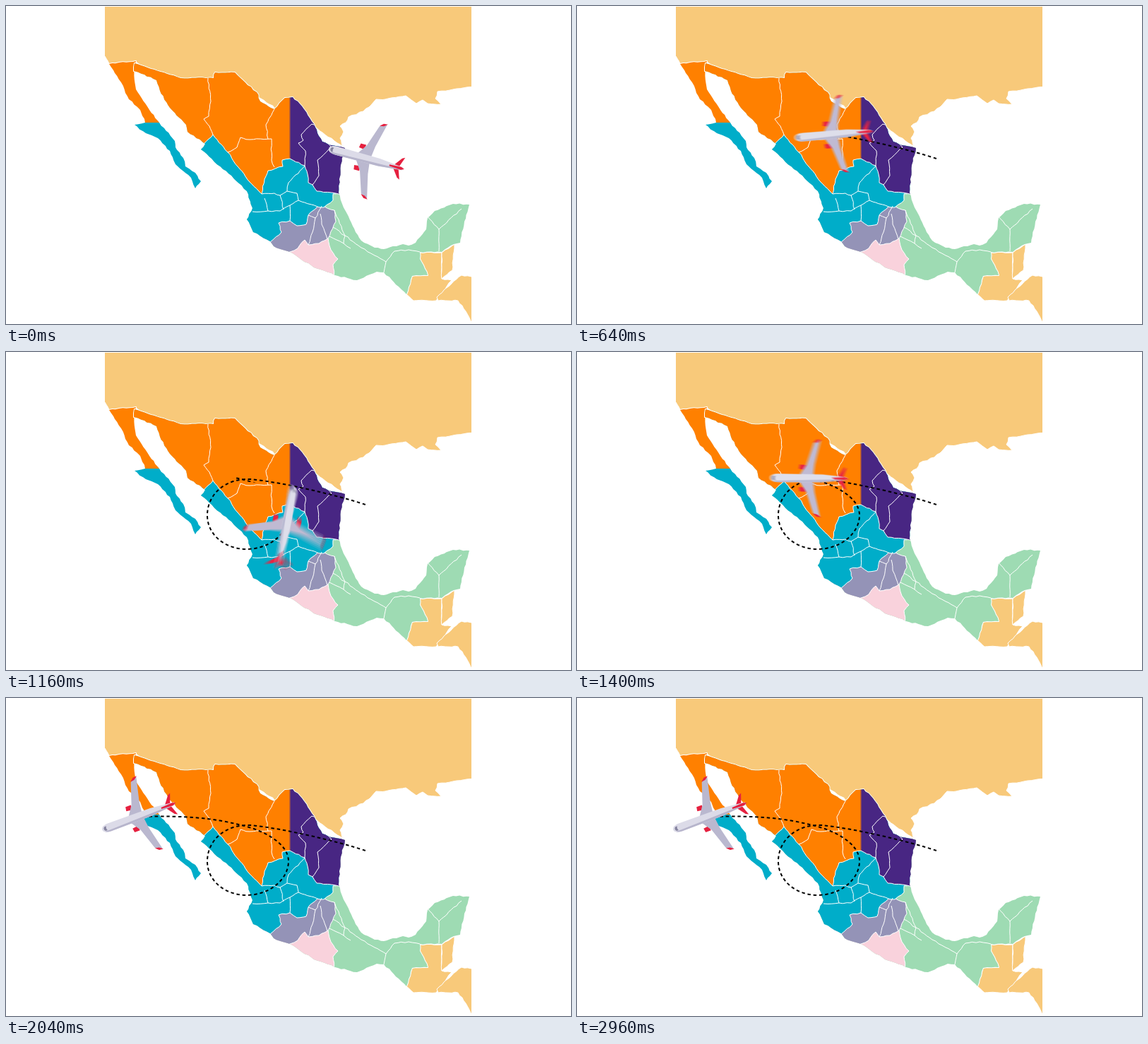
An HTML page with a canvas that plays this animation: 800x450 px, repeating every 3 s.

```html
<!DOCTYPE html>
<html lang="en">
<head>
<meta charset="utf-8">
<title>Flight over the map</title>
<style>
html, body { margin: 0; width: 100%; height: 100%; overflow: hidden; background: #fff; }
canvas { display: block; width: 800px; height: 450px; }
</style>
</head>
<body>
<canvas id="stage" width="800" height="450"></canvas>
<script>
const W = 800, H = 450, LOOP = 3000, FLIGHT = 2020, SHUTTER = 14, SAMPLES = 6;
const PEACH = '#f8c97a', ORANGE = '#ff8000', TEAL = '#00adc9', PURPLE = '#482683';
const LAVENDER = '#9493b7', PINK = '#f9d2dc', GREEN = '#9edbb3';
const RED = '#e5203f', WING = '#bab8cf', BODY = '#dcdbe8', SHADE = '#b7b5cc';

function layer() {
  const c = document.createElement('canvas');
  c.width = W;
  c.height = H;
  return c.getContext('2d');
}

const ctx = document.getElementById('stage').getContext('2d');
const trail = layer(), blur = layer(), scratch = layer();

let seed = 7;
function random() {
  seed = (seed * 16807) % 2147483647;
  return seed / 2147483647;
}

// joins a few key points with a slightly ragged line
function ragged(text, closed) {
  const pts = text.split(' ').map(s => s.split(',').map(Number));
  const path = new Path2D();
  path.moveTo(...pts[0]);
  const wobble = () => (random() - 0.5) * 1.6;
  for (let i = 1; i < pts.length + (closed ? 1 : 0); i++) {
    const [x0, y0] = pts[i - 1], [x1, y1] = pts[i % pts.length];
    const n = Math.max(1, Math.round(Math.hypot(x1 - x0, y1 - y0) / 5));
    for (let k = 1; k < n; k++) {
      path.lineTo(x0 + (x1 - x0) * k / n + wobble(), y0 + (y1 - y0) * k / n + wobble());
    }
    path.lineTo(x1, y1);
  }
  if (closed) path.closePath();
  return path;
}

// neighbouring lands; each runs on beneath the mainland or past the frame
const lands = [
  '130,-9 669,-9 669,113 638,117 611,121 608,131 616,139 597,138 590,133 581,138 566,127 537,132 524,132 514,143 506,149 485,157 481,165 473,170 478,178 473,187 477,199 420,160 390,150 330,112 250,108 200,91 184,79 146,82 140,71 130,60',
  '586,349 617,349 617,386 631,388 609,417 577,417 567,408 575,382 597,381 586,359',
  '617,349 635,337 632,374 617,386',
  '669,384 645,381 620,402 610,412 612,417 640,417 651,432 659,448 669,448'
];

const mainland = '182,81 247,102 294,102 296,94 324,94 342,112 355,122 360,135 380,146 395,130 406,129 422,146 436,167 441,180 448,192 460,197 480,201 474,225 471,264 476,280 495,320 503,332 522,342 535,344 562,337 570,339 580,335 595,316 597,300 607,290 633,280 656,281 649,305 643,335 634,337 617,348 586,348 586,358 597,381 575,382 567,408 535,377 525,376 497,388 470,382 436,370 402,348 379,340 374,333 350,320 341,302 349,286 341,262 315,237 276,203 282,195 257,178 255,168 232,144 218,120 213,105 196,97 181,92';

const peninsula = '146,82 184,78 181,90 184,118 203,147 217,165 239,191 240,200 251,215 254,227 268,236 276,248 268,258 262,243 240,224 232,205 215,187 198,180 182,168 197,165 190,147 174,132 163,108';

// painted one over the other inside the mainland, so each edge is given once
const zones = [
  [PINK, '380,330 456,328 460,345 470,358 463,366 466,390 380,390'],
  [LAVENDER, '370,300 440,275 447,283 465,289 467,305 456,329 443,336 428,338 423,331 413,343 402,348 380,355 350,340'],
  [TEAL, '260,205 300,170 473,170 472,264 463,266 463,275 450,285 441,284 428,296 425,309 412,311 402,304 386,307 390,320 374,334 300,340'],
  ['north', '130,60 500,60 500,265 471,266 440,262 434,253 428,250 427,238 423,226 402,216 391,218 392,227 371,233 366,245 362,266 345,249 328,227 314,207 293,182 280,195 130,195']
];

const borders = [
  '286,102 290,135 287,156 280,160 288,170 293,182',
  '314,207 327,200 332,186 345,189 376,188 376,218 380,228',
  '380,146 368,168 371,188',
  '433,167 418,182 421,190 414,194 424,205 423,226',
  '433,167 440,170 443,182 461,200 441,218 443,240 434,253',
  '423,226 400,250 398,262 412,265 414,275 441,284',
  '362,266 380,265 388,268 398,262',
  '349,291 371,290 388,290 402,282 414,275',
  '371,290 366,272',
  '388,268 393,288',
  '402,282 402,304',
  '428,296 438,300 447,283',
  '438,300 434,320 428,338',
  '445,294 447,309 455,330',
  '465,289 480,325 503,342 522,353 538,362 535,377',
  '463,313 480,325 478,336',
  '458,326 478,336 488,343',
  '538,362 550,347 570,345 586,348',
  '613,347 613,316 597,298',
  '613,316 645,287'
];

function drawBorder(g, path) {
  g.lineWidth = 1;
  g.stroke(path);
}

function buildMap() {
  const g = layer();
  const north = g.createLinearGradient(400.5, 0, 403.5, 0);
  north.addColorStop(0, ORANGE);
  north.addColorStop(1, PURPLE);
  g.fillStyle = '#fff';
  g.fillRect(0, 0, W, H);
  g.beginPath();
  g.rect(140, 1, 519, 447);
  g.clip();
  g.lineJoin = 'round';
  g.strokeStyle = '#fff';

  for (const land of lands) {
    const p = ragged(land, true);
    g.fillStyle = PEACH;
    g.fill(p);
    drawBorder(g, p);
  }

  // white outline first, so that the fill keeps its full size
  const paintClipped = (outline, paint) => {
    const p = ragged(outline, true);
    g.lineWidth = 2;
    g.stroke(p);
    g.save();
    g.clip(p);
    paint();
    g.restore();
  };

  paintClipped(peninsula, () => {
    g.fillStyle = ORANGE;
    g.fillRect(0, 0, W, 165);
    g.fillStyle = TEAL;
    g.fillRect(0, 165, W, H);
  });

  paintClipped(mainland, () => {
    g.fillStyle = GREEN;
    g.fillRect(0, 0, W, H);
    for (const [color, points] of zones) {
      const p = ragged(points, true);
      g.fillStyle = color === 'north' ? north : color;
      g.fill(p);
      drawBorder(g, p);
    }
    for (const points of borders) drawBorder(g, ragged(points));
  });
  return g.canvas;
}

const ROUTE = 'M509 216C470 203 395 185 347 180C310 178 285 202 285 231C285 260 312 279 340 279' +
  'C374 279 400 256 400 231C400 206 365 187 333 180C295 170 255 166 187 168';
const route = document.createElementNS('http://www.w3.org/2000/svg', 'path');
route.setAttribute('d', ROUTE);
const routeShape = new Path2D(ROUTE);
const routeLength = route.getTotalLength();
const map = buildMap();

function progress(t) {
  const k = Math.min(1, Math.max(0, t / FLIGHT));
  return (1 - Math.cos(Math.PI * k)) / 2;
}

// degrees by which the nose turns off the route
function leadAt(p) {
  return 13 - 10 * Math.exp(-40 * p) + 5.5 * p ** 12;
}

function poly(g, color, points) {
  g.fillStyle = color;
  g.fill(new Path2D('M' + points + 'Z'));
}

// wing, engine and tailplane of one side
function drawSide(g) {
  poly(g, RED, '-13,13 -5,12 -4,19 -12,19');
  poly(g, WING, '-13,4 7,4 9,20 17,54 11,53 7,49 -3,19');
  poly(g, RED, '7,50 13,51 18,55 12,54.5');
  poly(g, RED, '41,2 49,2 54,16 50,14');
}

function drawPlane(g, t) {
  const p = progress(t), s = p * routeLength;
  const at = route.getPointAtLength(s);
  const a = route.getPointAtLength(Math.max(0, s - 1));
  const b = route.getPointAtLength(Math.min(routeLength, s + 1));
  const size = 1 + 0.2 * Math.exp(-(((p - 0.49) / 0.12) ** 2));
  g.save();
  g.translate(at.x, at.y);
  g.rotate(Math.atan2(a.y - b.y, a.x - b.x) - leadAt(p) * Math.PI / 180);
  g.scale(size, size);
  drawSide(g);
  g.scale(1, -1);
  drawSide(g);
  g.scale(1, -1);
  poly(g, BODY, '-54 0C-54 -4 -49 -6 -43 -6L20 -5.5L54 -2Q57 0 54 2L20 5.5L-43 6C-49 6 -54 4 -54 0');
  poly(g, SHADE, '-51 4Q-48 3.4 -43 3.6L54 1L54 2L20 5.5L-43 6Q-48 6 -51 4');
  poly(g, '#85839f', '-50 -3Q-53 0 -50 3L-47 3Q-49 0 -47 -3');
  poly(g, RED, '35,-1 52,-2 57,0 52,2 35,1');
  g.restore();
}

function drawTrail(p) {
  const g = trail;
  g.clearRect(0, 0, W, H);
  if (p <= 0) return;
  g.strokeStyle = '#000';
  g.lineWidth = 2;
  g.setLineDash([4.5, 3.8]);
  g.stroke(routeShape);
  // a wide stroke reveals the dashes up to the plane
  g.globalCompositeOperation = 'destination-in';
  g.lineWidth = 8;
  g.setLineDash([p * routeLength, routeLength * 2]);
  g.stroke(routeShape);
  g.globalCompositeOperation = 'source-over';
  ctx.drawImage(g.canvas, 0, 0);
}

function drawBlurred(t) {
  blur.clearRect(0, 0, W, H);
  blur.globalCompositeOperation = 'lighter';
  blur.globalAlpha = 1 / SAMPLES;
  for (let i = 0; i < SAMPLES; i++) {
    scratch.clearRect(0, 0, W, H);
    drawPlane(scratch, t + SHUTTER * ((i + 0.5) / SAMPLES - 0.5));
    blur.drawImage(scratch.canvas, 0, 0);
  }
  ctx.drawImage(blur.canvas, 0, 0);
}

function render(t) {
  ctx.drawImage(map, 0, 0);
  drawTrail(progress(t));
  if (t < SHUTTER || t >= FLIGHT) drawPlane(ctx, t);
  else drawBlurred(t);
}

const start = performance.now();
function tick(now) {
  render(Math.max(0, now - start) % LOOP);
  requestAnimationFrame(tick);
}
render(0);
requestAnimationFrame(tick);
</script>
</body>
</html>
```
